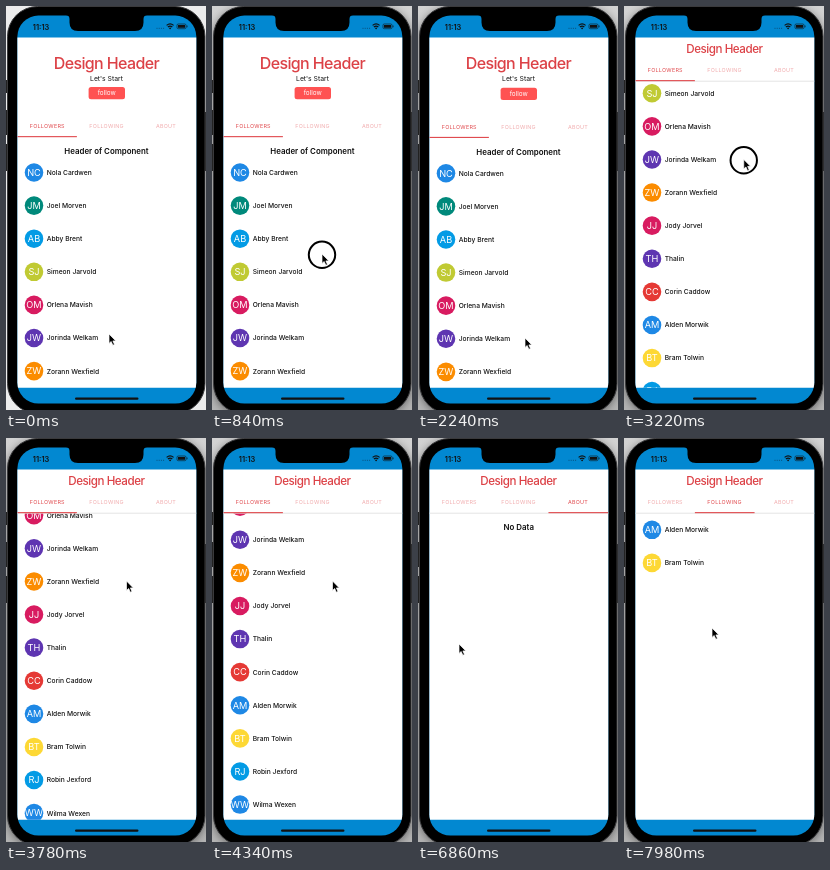
Recreate the animation shown at these times as an HTML page. Size 200 by 404 pixels, loop 8000 ms.

```html
<!DOCTYPE html>
<html lang="en">
<head>
<meta charset="utf-8">
<title>Collapsible header tabs</title>
<style>
  html, body { margin: 0; width: 100%; height: 100%; overflow: hidden; background: #c4c4c4; }
  svg { display: block; width: 100vw; height: 100vh; }
  text { font-family: Inter, Roboto, sans-serif; fill: #111; }
  .mid { text-anchor: middle; }
  .title { font-size: 16px; font-weight: 450; letter-spacing: -.62px; fill: #dc4146; }
  .head { font-size: 7.9px; font-weight: 600; }
  .name { font-size: 6.7px; font-weight: 550; }
  .initials { font-size: 9.2px; fill: #fff; }
  .tab { font-size: 5.4px; letter-spacing: .25px; fill: #e0484c; }
</style>
</head>
<body>
<svg viewBox="0 0 200 404" preserveAspectRatio="none">
  <defs>
    <linearGradient id="shade" x2="0" y2="1">
      <stop offset="0" stop-color="#d2d2d2"/>
      <stop offset="1" stop-color="#b4b4b4"/>
    </linearGradient>
    <filter id="blur"><feGaussianBlur stdDeviation="4"/></filter>
    <clipPath id="screen"><rect x="11.4" y="9.6" width="178.9" height="388" rx="21"/></clipPath>
    <clipPath id="body"><rect x="11" y="31.4" width="180" height="350.4"/></clipPath>
    <clipPath id="below"><rect id="belowBox" x="11" width="180" height="400"/></clipPath>
  </defs>

  <rect width="200" height="404" fill="url(#shade)"/>
  <rect x="1.5" y="2" width="197.5" height="407" rx="30" opacity=".45" filter="url(#blur)"/>
  <rect id="glow" width="200" height="404" fill="#ececec"/>
  <path d="M0 74h3v13H0zM0 104h3v25H0zM0 138h3v27H0zM197 106h3v59h-3z" fill="#222"/>
  <rect x="1.5" y=".5" width="197.5" height="407" rx="30" stroke="#3a3a3c"/>

  <g clip-path="url(#screen)">
    <rect x="11" y="9" width="180" height="390" fill="#0288d1"/>
    <g clip-path="url(#body)">
      <rect x="11" y="31" width="180" height="351" fill="#fff"/>
      <g clip-path="url(#below)">
        <g id="pages">
          <g id="followers"><text class="mid head" x="100.5" y="148">Header of Component</text></g>
          <g id="following" transform="translate(179)"></g>
          <text class="mid head" x="458.5" y="92.4">No Data</text>
        </g>
      </g>
      <g id="intro">
        <text class="mid" x="100.5" y="74.6" font-size="6.8">Let's Start</text>
        <rect x="82.6" y="81" width="36.4" height="12.3" rx="2.5" fill="#ff5252"/>
        <text class="mid" x="100.7" y="89.4" font-size="6.4" style="fill:#fff">follow</text>
      </g>
      <g id="title"><text class="mid title">Design Header</text></g>
      <g id="bar">
        <path id="rule" d="M11 131.2H191" stroke="#dedede" stroke-width=".8"/>
        <text class="mid tab" x="41.3" y="122.1">FOLLOWERS</text>
        <text class="mid tab" x="100.6" y="122.1">FOLLOWING</text>
        <text class="mid tab" x="160" y="122.1">ABOUT</text>
        <rect id="mark" y="130.1" width="59.7" height="1.1" fill="#e0484c"/>
      </g>
    </g>

    <text x="26.8" y="23.5" font-size="7.4" font-weight="600">11:13</text>
    <path d="M150.5 22.3h8" stroke="#084f7c" stroke-dasharray="1 1.2"/>
    <g fill="none" stroke="#111" stroke-width="1.2">
      <path d="M160.6 19.4q3.5-3 7 0M161.9 21q2.2-1.9 4.4 0"/>
      <rect x="171" y="18" width="9" height="4.7" rx="1.3" stroke-width=".6"/>
    </g>
    <circle cx="164.1" cy="22.3" r=".9" fill="#111"/>
    <path d="M172 19h7v2.7h-7zM180.7 19.5h.7v1.7h-.7z" fill="#111"/>
    <rect x="69" y="391.5" width="63.5" height="2.3" rx="1.15" fill="#111"/>
  </g>
  <path d="M60 9Q63.5 9.5 63.5 13V16.5Q63.5 25 72 25H129Q137.5 25 137.5 16.5V13Q137.5 9.5 141 9Z"/>

  <g id="pointer">
    <circle id="ring" cy=".8" r="13.2" fill="none" stroke="#000" stroke-width="2"/>
    <path d="M0 0V9.4L2.2 7.5 3.8 11.2 5.5 10.5 3.9 6.9H6.8Z" stroke="#fff" stroke-width=".7"/>
  </g>
</svg>

<script>
const LOOP = 8000, STEP = 140;
const PAGE = 179, FOLD = 56, VIEW = 350, SCROLL_END = 231.7;
const $ = id => document.getElementById(id);
const clamp = (v, lo, hi) => Math.min(hi, Math.max(lo, v));
const mix = (a, b, u) => a + (b - a) * u;
const ease = (t, from, to) => {
  const u = clamp((t - from) / (to - from), 0, 1);
  return u * u * (3 - 2 * u);
};
const decay = (ms, tau) => Math.exp(-Math.max(0, ms) / tau);

const blue = '#1e88e5', sky = '#039be5', pink = '#d81b60', violet = '#5e35b1';
const people = [
  ['Nola Cardwen', blue], ['Joel Morven', '#00897b'], ['Abby Brent', sky],
  ['Simeon Jarvold', '#c0ca33'], ['Orlena Mavish', pink], ['Jorinda Welkam', violet],
  ['Zorann Wexfield', '#fb8c00'], ['Jody Jorvel', pink], ['Thalin', violet],
  ['Corin Caddow', '#e53935'], ['Alden Morwik', blue], ['Bram Tolwin', '#fdd835'],
  ['Robin Jexford', sky], ['Wilma Wexen', blue]
];

function initials(name) {
  const [first, last] = name.split(' ');
  return (last ? first[0] + last[0] : first.slice(0, 2)).toUpperCase();
}

function addRows(parent, list, top) {
  parent.insertAdjacentHTML('beforeend', list.map(([name, color], i) =>
    `<g class="row" transform="translate(0 ${top + 33.1 * i})">
      <circle cx="28" r="9.3" fill="${color}"/>
      <text class="mid initials" x="28" y="3.3">${initials(name)}</text>
      <text class="name" x="40.7" y="2.4">${name}</text>
    </g>`).join(''));
}
addRows($('followers'), people, 166.5);
addRows($('following'), people.slice(10, 12), 91.8);

const tapped = $('followers').querySelectorAll('.row')[8];
const tabs = document.querySelectorAll('.tab');

// Pointer presses; scrolling and paging follow from them.
const press = (kind, start, end, from, to = from) => ({ kind, start, end, from, to });
const gestures = [
  press('pull', 840, 1680, [110, 248], [113, 335]),
  press('fling', 2380, 3360, [107, 332], [120.5, 143]),
  press('tap', 5040, 5300, [124, 206]),
  press('swipe', 5600, 5880, [168, 208], [55, 207]),
  press('swipe', 6160, 6440, [176, 207], [41, 206]),
  press('swipe', 6930, 7280, [41, 206], [140, 200])
];
const rest = press('rest', LOOP, LOOP, [88, 190]);

function pointerAt(t) {
  let pos = [103, 328], free = 0;
  for (const g of [...gestures, rest]) {
    const leave = Math.max(free, g.start - 700);
    const travel = ease(t, leave, g.start - 140), drag = ease(t, g.start, g.end + .01);
    pos = pos.map((v, k) => mix(mix(v, g.from[k], travel), g.to[k], drag));
    if (t < g.start) break;
    free = g.end;
  }
  return pos;
}

const rubber = d => VIEW * (1 - 1 / (d * .55 / VIEW + 1));

function stateAt(t) {
  const [x, y] = pointerAt(t);
  let scroll = 0, page = 0, held = null;
  for (const g of gestures) {
    if (t < g.start) break;
    const active = t < g.end, since = t - g.end;
    if (active) held = g;
    const dx = (active ? x : g.to[0]) - g.from[0];
    const dy = (active ? y : g.to[1]) - g.from[1];
    if (g.kind === 'pull') scroll = -rubber(dy) * decay(since, 140);
    if (g.kind === 'fling') scroll = active ? -dy : mix(SCROLL_END, -dy, decay(since, 290));
    if (g.kind === 'swipe') {
      const dragged = -dx / PAGE;
      page += active ? dragged : mix(Math.sign(dragged), dragged, decay(since, 80));
    }
  }
  return { x, y, scroll, page, held };
}

const set = (id, name, value) => $(id).setAttribute(name, value);
const move = (id, x, y, extra = '') => set(id, 'transform', `translate(${x} ${y})${extra}`);

function draw(t) {
  const { x, y, scroll, page, held } = stateAt(t);
  const shift = Math.min(scroll, FOLD), fold = clamp(scroll / FOLD, 0, 1);

  move('followers', 0, -scroll);
  move('pages', -PAGE * page, 0);
  set('belowBox', 'y', 131.2 - shift);

  move('title', 100.4, 62.6 - 15.8 * fold - Math.min(scroll, 0), ` scale(${1 - .276 * fold})`);
  move('intro', 0, -shift);
  set('intro', 'opacity', clamp(1 - 2 * fold, 0, 1));
  move('bar', 0, -shift);
  set('rule', 'opacity', fold);
  set('mark', 'x', 11.2 + PAGE / 3 * page);
  tabs.forEach((tab, i) =>
    tab.setAttribute('opacity', .45 + .55 * Math.max(0, 1 - Math.abs(page - i))));

  tapped.setAttribute('opacity', held?.kind === 'tap' ? .2 : 1);
  move('pointer', x, y);
  set('ring', 'opacity', held ? 1 : 0);
  set('glow', 'opacity', t < gestures[0].start ? 1 : 0);
}

function frame() {
  const t = performance.now() % LOOP;
  draw(Math.floor(t / STEP) * STEP);
  requestAnimationFrame(frame);
}
frame();
</script>
</body>
</html>
```
